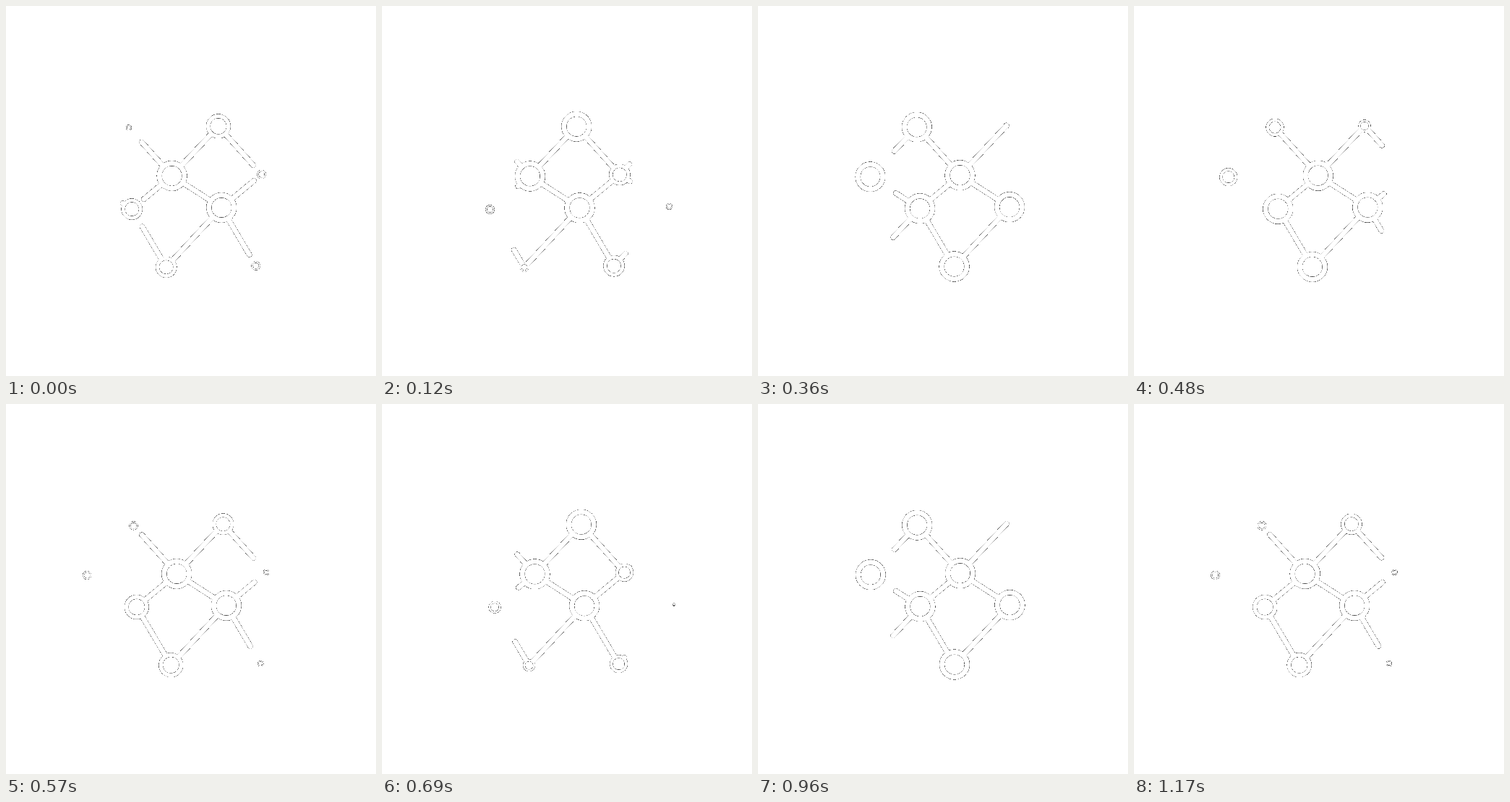
Write an HTML page with a canvas that moves like this. It is 512 px wide and 512 px high and loops after 1.2 s.

```html
<!DOCTYPE html>
<html>
<head>
<meta charset="utf-8">
<style>
  html, body { margin: 0; width: 100%; height: 100%; overflow: hidden; background: #fff; }
  canvas { display: block; width: 512px; height: 512px; }
</style>
</head>
<body>
<canvas id="stage" width="512" height="512"></canvas>
<script>
const ctx = document.getElementById('stage').getContext('2d', { willReadFrequently: true });
const LOOP = 1200, STEP = 30;
const PERIOD = 602, SPACING = 124, SPEED = SPACING / PERIOD;
const GROW = 300, TILT = 0.0165, RADIUS = 17.4, WIDTH = 7.1;
const MIN_ALPHA = 64;

// One unit of the repeating network: place at time 0, start of growth and of shrinking
const nodes = {
  A: { x: 293.9, y: 167, grow: -243, shrink: 357 },
  B: { x: 229.6, y: 234.6, grow: -692, shrink: 357 },
  C: { x: 298.2, y: 279.7, grow: -545, shrink: 512 },
  D: { x: 345.7, y: 360.8, grow: -90, shrink: 512 }
};

// Links grow out of one node and retract into the other; shift picks the neighbouring unit
const links = [
  { from: 'A', to: 'B', toShift: 1, grow: -243, shrink: 512 },
  { from: 'C', to: 'B', toShift: 1, grow: -243, shrink: 512 },
  { from: 'C', to: 'D', grow: -243, shrink: 512 },
  { from: 'B', to: 'A', grow: -545, shrink: 205 },
  { from: 'B', to: 'C', grow: -545, shrink: 205, firstShrink: 357 },
  { from: 'D', to: 'C', fromShift: -1, grow: -545, shrink: 205 }
];

const progress = (time, start) => Math.min(1, Math.max(0, (time - start) / GROW));

function place(name, time, shift = 0) {
  const x = nodes[name].x + shift * SPACING - SPEED * time;
  return { x, y: nodes[name].y - TILT * (x - 256) };
}

function drawLink(link, time, first) {
  const head = progress(time, link.grow);
  const tail = progress(time, first && link.firstShrink || link.shrink);
  if (head <= tail) return;
  const a = place(link.from, time, link.fromShift);
  const b = place(link.to, time, link.toShift);
  const dx = b.x - a.x, dy = b.y - a.y;
  ctx.lineWidth = WIDTH;
  ctx.beginPath();
  ctx.moveTo(a.x + dx * tail, a.y + dy * tail);
  ctx.lineTo(a.x + dx * head, a.y + dy * head);
  ctx.stroke();
}

function drawNode(name, time) {
  const node = nodes[name];
  const scale = progress(time, node.grow) - progress(time, node.shrink);
  if (scale <= 0) return;
  const { x, y } = place(name, time);
  ctx.beginPath();
  ctx.arc(x, y, RADIUS * scale, 0, Math.PI * 2);
  ctx.globalCompositeOperation = 'destination-out';
  ctx.fill();
  ctx.globalCompositeOperation = 'source-over';
  ctx.lineWidth = WIDTH * scale;
  ctx.stroke();
}

// Hard alpha cut: soft edge pixels turn grey or vanish, leaving broken hairlines
function cutEdges() {
  const image = ctx.getImageData(0, 0, 512, 512);
  const px = image.data;
  for (let i = 0; i < px.length; i += 4) {
    const alpha = px[i + 3];
    px[i] = px[i + 1] = px[i + 2] = alpha < MIN_ALPHA ? 255 : alpha;
    px[i + 3] = 255;
  }
  ctx.putImageData(image, 0, 0);
}

function draw(t) {
  ctx.clearRect(0, 0, 512, 512);
  ctx.strokeStyle = ctx.fillStyle = '#fff';
  ctx.lineCap = 'round';
  const units = [-1, 0, 1, 2, 3];
  for (const k of units)
    for (const link of links) drawLink(link, t - k * PERIOD, k < 0);
  for (const k of units)
    for (const name in nodes)
      if (k >= 0 || name !== 'B') drawNode(name, t - k * PERIOD);
  cutEdges();
}

let shown = -1;
function tick() {
  const t = Math.floor(performance.now() % LOOP / STEP) * STEP;
  if (t !== shown) draw(shown = t);
  requestAnimationFrame(tick);
}
tick();
</script>
</body>
</html>
```
